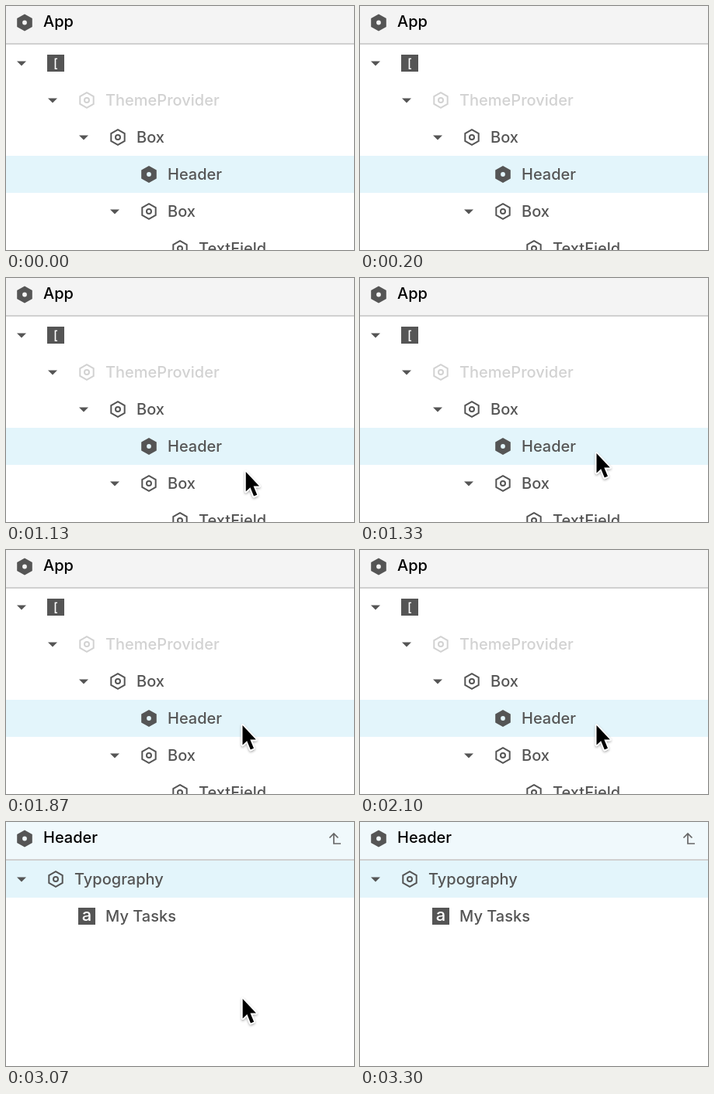
Recreate the animation shown at these times as an HTML page. Size 448 by 316 pixels, loop 4.2 s.

```html
<!DOCTYPE html>
<html lang="en">
<head>
<meta charset="utf-8">
<title>Component tree</title>
<style>
  html, body { margin: 0; width: 100%; height: 100%; overflow: hidden; background: #fff; }
  svg { display: block; }
  text { font: 500 20px Inter, "Liberation Sans", sans-serif; }
</style>
</head>
<body>
<svg id="stage" width="448" height="316" viewBox="0 0 448 316">
  <defs>
    <path id="solid" fill="#555" fill-rule="evenodd"
      d="M0-11 9.8-5.5V5.5L0 11-9.8 5.5V-5.5ZM-2.9 0a2.9 2.9 0 1 0 5.8 0a2.9 2.9 0 1 0-5.8 0Z"/>
    <g id="hollow" fill="none" stroke="currentColor" stroke-width="2">
      <path d="M0-9.8 8.7-4.9V4.9L0 9.8-8.7 4.9V-4.9Z"/>
      <circle r="3"/>
    </g>
    <path id="caret" fill="#555" d="M-6-2.5H6L0 3.5Z"/>
    <rect id="square" x="-11" y="-11" width="22" height="22" fill="#555"/>
    <filter id="shadow" x="-50%" y="-50%" width="200%" height="200%">
      <feDropShadow dx="0" dy="1.5" stdDeviation="1.5" flood-opacity=".35"/>
    </filter>
  </defs>
  <g id="app"></g>
  <g id="header"></g>
  <path id="cursor" d="M.5 1V26.5L6.2 21.2 10.8 32.6 15 30.8 10.3 19.6H17.8Z"
    stroke="#fff" stroke-width="3.4" stroke-linejoin="round" paint-order="stroke" filter="url(#shadow)"/>
</svg>
<script>
const $ = id => document.getElementById(id);
const GREY = '#555';

const rect = (y, h, fill) => `<rect y="${y}" width="448" height="${h}" fill="${fill}"/>`;
const icon = (id, x, y, color = GREY) => `<use href="#${id}" x="${x}" y="${y}" color="${color}"/>`;
const label = (s, x, y, color = GREY) => `<text x="${x}" y="${y}" fill="${color}">${s}</text>`;

const titleBar = (title, fill) =>
  rect(0, 49, fill) + rect(48, 2, '#d0d0d0') +
  icon('solid', 24, 21.5) + label(title, 48, 27, '#000');

// Tree row: indent level and row index set the position
function row(level, index, name, { kind = 'hollow', caret = true, color = GREY } = {}) {
  const x = 24 + level * 40, y = 74 + index * 48;
  return (caret ? icon('caret', x - 4, y) : '') +
    icon(kind, x + 40, y, color) + label(name, x + 64, y + 7, color);
}

const glyph = (s, x, y, size, dy) => icon('square', x, y) +
  `<text x="${x}" y="${y + dy}" text-anchor="middle" fill="#fff" style="font-size:${size}px">${s}</text>`;

$('app').innerHTML =
  titleBar('App', '#f4f4f4') + rect(194, 48, '#e3f5fb') +
  icon('caret', 20, 74) + glyph('[', 64, 74, 16, 5.5) +
  row(1, 1, 'ThemeProvider', { color: '#d2d2d2' }) +
  row(2, 2, 'Box') +
  row(3, 3, 'Header', { kind: 'solid', caret: false }) +
  row(3, 4, 'Box') +
  row(4, 5, 'TextField', { caret: false });

$('header').innerHTML =
  titleBar('Header', '#f0f9fc') + rect(50, 48, '#e3f5fb') +
  '<path d="M416.5 20.5 422 15 427.5 20.5M422 15.5V28H431" fill="none" stroke="#666" stroke-width="1.7"/>' +
  row(0, 0, 'Typography') +
  glyph('a', 104, 122, 22, 6) + label('My Tasks', 128, 129);

const LOOP = 4200, SWITCH = 2170, STEP = 100 / 3;
const REST = [304, 226], ENTRY = [321, 322], EXIT = [313, 326];
const mix = (a, b, p) => a.map((v, i) => v + (b[i] - v) * p);
const stepped = (t, start) => start + Math.floor((t - start + 0.01) / STEP) * STEP;

function cursorAt(t) {
  if (t < 930 || t >= 3300) return null;
  if (t < 1330) return mix(ENTRY, REST, 1 - (1 - (stepped(t, 930) - 930) / 400) ** 2);
  if (t < 3070) return REST;
  return mix(REST, EXIT, ((stepped(t, 3070) - 3038) / 232) ** 2);
}

function draw(t) {
  const opened = t >= SWITCH;
  $('app').style.display = opened ? 'none' : '';
  $('header').style.display = opened ? '' : 'none';
  const pos = cursorAt(t);
  $('cursor').style.display = pos ? '' : 'none';
  if (pos) $('cursor').setAttribute('transform', `translate(${pos})`);
}

const start = performance.now();
function tick() {
  draw((performance.now() - start) % LOOP);
  requestAnimationFrame(tick);
}
tick();
</script>
</body>
</html>
```
